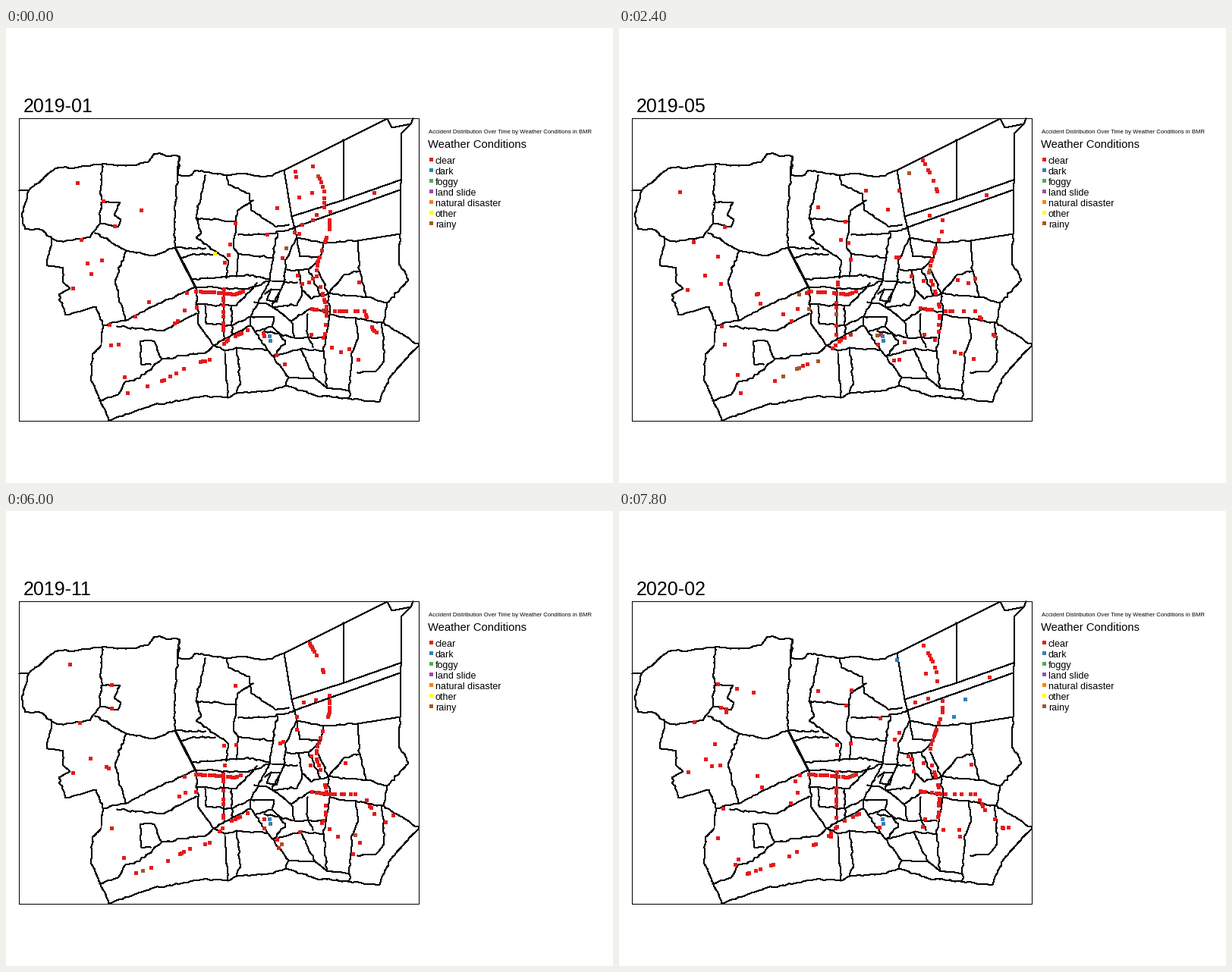
A matplotlib script that plays this animation: 800x600 px, repeating every 8 s.

```python
import numpy as np
import matplotlib.pyplot as plt
from matplotlib.animation import FuncAnimation
from matplotlib.patches import Rectangle

plt.rcParams["font.family"] = "Liberation Sans"
PX = 0.72  # points per pixel at 100 dpi
rng = np.random.default_rng(4)

KINDS = {
    "clear": "#E41A1C", "dark": "#377EB8", "foggy": "#4DAF4A",
    "land slide": "#984EA3", "natural disaster": "#FF7F00",
    "other": "#FFFF00", "rainy": "#A65628",
}

fig = plt.figure(figsize=(8, 6), dpi=100, facecolor="white")
ax = fig.add_axes([0, 0, 1, 1])
ax.set(xlim=(0, 800), ylim=(600, 0))
ax.axis("off")


def pairs(*values):
    return np.reshape(np.array(values, float), (-1, 2))


def straight(*xy):
    p = pairs(*xy) + 0.5
    ax.plot(p[:, 0], p[:, 1], color="black", lw=PX, antialiased=False, zorder=1)


def edge(*xy):
    """Border line with a small irregular wobble."""
    p = pairs(*xy)
    out = [p[0]]
    for a, b in zip(p[:-1], p[1:]):
        n = max(1, int(np.hypot(*(b - a)) / 4))
        for k in range(1, n):
            out.append(a + (b - a) * k / n + rng.normal(0, 0.7, 2))
        out.append(b)
    straight(*np.ravel(out))


# Outer border
edge(17, 214, 30, 213, 64, 185, 95, 183, 126, 179, 165, 181, 187, 176, 195, 165, 228, 169)
edge(30, 213, 20, 245, 25, 265, 44, 265, 60, 277)
edge(60, 277, 53, 312, 75, 316, 74, 334, 84, 343, 69, 351, 78, 378, 118, 367, 127, 391)
edge(127, 391, 125, 418, 113, 430, 112, 465, 135, 517)
edge(135, 517, 195, 496, 265, 485, 292, 487, 303, 481, 352, 477, 368, 471,
     410, 485, 492, 492, 504, 462, 543, 419)
edge(228, 169, 226, 193, 240, 195, 250, 187, 291, 194, 313, 191, 340, 196, 366, 187)
straight(366, 187, 502, 119, 508, 131, 533, 126, 536, 119)
straight(533, 126, 521, 138, 519, 271)
edge(519, 271, 517, 310, 530, 332, 502, 362, 497, 388, 543, 416)

# Western districts
edge(126, 179, 124, 257, 110, 276, 68, 281, 60, 277)
edge(125, 230, 150, 230, 142, 246, 151, 252, 147, 262, 124, 257)
edge(117, 270, 158, 293, 193, 300, 222, 289)
edge(158, 293, 143, 335, 157, 385)
edge(127, 391, 158, 385, 200, 363, 250, 341)
edge(146, 393, 207, 399, 250, 376)
edge(228, 169, 222, 240, 222, 289)
straight(222, 289, 249, 342)
straight(223, 289, 250, 342)
edge(123, 491, 147, 483, 157, 466, 176, 461, 205, 436, 262, 428, 273, 418, 253, 390)
edge(205, 436, 195, 413, 176, 412, 178, 443, 190, 443)

# Northern districts
edge(262, 194, 250, 250, 257, 270, 250, 276, 292, 306, 290, 329)
edge(250, 250, 303, 255, 305, 240, 325, 227)
edge(291, 194, 293, 206, 320, 218, 323, 240, 355, 262, 372, 259)
edge(303, 255, 299, 288, 306, 298, 303, 327)
edge(306, 272, 345, 271, 378, 264)
edge(222, 289, 262, 290)
edge(230, 303, 245, 298, 275, 298)
edge(306, 298, 352, 302)
straight(366, 187, 376, 248, 383, 276)
straight(376, 248, 445, 226, 519, 200)
straight(378, 263, 519, 213)
straight(444, 147, 445, 226)
edge(383, 276, 418, 283, 463, 280)
straight(463, 280, 519, 271)

# Eastern districts
edge(463, 280, 466, 320, 474, 353)
edge(466, 320, 445, 325, 424, 350)
edge(424, 350, 474, 354, 502, 362)
edge(424, 350, 426, 378, 497, 388)
edge(426, 378, 418, 425, 422, 474, 452, 478)
edge(460, 382, 464, 408, 455, 428, 452, 486)
edge(495, 389, 498, 438, 487, 452, 463, 454)
edge(418, 425, 388, 423, 407, 462, 422, 474)

# Southern districts
edge(273, 418, 288, 425, 292, 487)
edge(288, 425, 303, 421, 308, 465, 304, 481)
edge(303, 421, 345, 425, 372, 460, 368, 471)
edge(352, 432, 390, 422)
edge(372, 460, 407, 462)

# Central districts
edge(245, 331, 325, 325, 346, 331)
edge(250, 341, 318, 344, 347, 333)
edge(250, 342, 253, 390)
edge(250, 364, 303, 366, 330, 336)
edge(262, 366, 264, 390, 297, 392, 322, 380)
straight(286, 343, 287, 406)
edge(297, 366, 298, 404)
edge(273, 418, 322, 392, 345, 425)
edge(357, 270, 347, 333, 322, 380, 322, 392)
edge(383, 276, 368, 305, 366, 336, 350, 367)
edge(383, 276, 386, 300, 414, 303, 418, 283)
edge(370, 318, 398, 318, 414, 303)
edge(385, 320, 390, 350, 383, 365, 350, 367)
edge(398, 318, 414, 352, 424, 350)
edge(410, 318, 424, 350)
edge(390, 345, 402, 357, 414, 352)
edge(347, 333, 383, 335)
straight(341, 350, 349, 344, 361, 345, 356, 361, 343, 358, 349, 344)
edge(327, 361, 350, 367, 375, 386, 400, 370, 426, 374)
edge(322, 380, 353, 381, 350, 393, 330, 399)
edge(350, 393, 368, 412, 352, 432)
edge(375, 386, 380, 408, 418, 408)
edge(397, 377, 397, 403, 404, 420)
edge(340, 399, 380, 408)

ax.add_patch(Rectangle((16.5, 118.5), 527, 399, fill=False, lw=PX,
                       ec="black", antialiased=False, zorder=2))

# Roads with the usual number of accidents on each
ROADS = [
    (pairs(250, 347, 285, 349, 300, 351, 314, 347), 18),
    (pairs(288, 335, 286, 348, 286, 405), 9),
    (pairs(400, 174, 411, 194, 419, 214, 419, 236), 8),
    (pairs(426, 250, 426, 266, 410, 311, 408, 324), 13),
    (pairs(408, 324, 422, 366, 421, 400, 416, 412), 13),
    (pairs(394, 369, 425, 373, 472, 373), 12),
    (pairs(474, 378, 484, 398, 500, 410), 5),
    (pairs(160, 481, 206, 465, 243, 444, 268, 437), 10),
    (pairs(279, 424, 292, 411, 322, 396), 7),
]

# Places where accidents recur
SITES = pairs(
    92, 205, 129, 229, 140, 260, 155, 234, 178, 240, 99, 280, 126, 305, 89, 343,
    134, 337, 113, 325, 180, 350, 187, 362, 214, 376, 226, 385, 236, 371, 250, 370,
    237, 350, 136, 393, 140, 418, 154, 457, 305, 234, 262, 237, 324, 212, 299, 255,
    294, 284, 287, 309, 304, 306, 345, 272, 356, 238, 382, 190, 382, 224, 391, 252,
    384, 270, 408, 247, 425, 242, 486, 218, 403, 215, 371, 291, 364, 302, 385, 327,
    400, 334, 447, 333, 465, 335, 340, 406, 342, 417, 355, 432, 363, 438, 388, 423,
    402, 405, 428, 420, 441, 426, 452, 421, 450, 430, 465, 438, 515, 419, 275, 428)

BUSY = [1.1, 0.9, 0.95, 0.9, 0.85, 0.8, 0.85, 0.85, 0.9, 0.9, 1, 1.05, 1, 1]
RAIN = [0.02, 0.02, 0.02, 0.05, 0.1, 0.08, 0.06, 0.1, 0.15, 0.08, 0.03, 0.01, 0.01, 0.01]
DECEMBER = 11
DARK = pairs(347, 406, 348, 412)
DARK_DECEMBER = pairs(373, 250, 413, 263, 455, 258, 497, 208, 263, 290,
                      254, 308, 283, 299, 335, 296, 274, 297)
DARK_LATE = pairs(366, 196, 456, 248, 441, 271)
OTHER = {0: pairs(275, 297), DECEMBER: pairs(449, 184)}


def on_road(road, count):
    """Random stops, three pixels apart or more, along a polyline."""
    dist = np.r_[0, np.cumsum(np.hypot(*np.diff(road, axis=0).T))]
    stops = np.arange(0, dist[-1], 3)
    at = rng.choice(stops, min(count, len(stops)), replace=False)
    return np.column_stack([np.interp(at, dist, road[:, k]) for k in (0, 1)])


def make_month(m):
    parts = [on_road(road, round(n * BUSY[m])) for road, n in ROADS]
    usual = SITES[rng.random(len(SITES)) < 0.6 * BUSY[m]]
    stray = SITES[rng.integers(len(SITES), size=60 if m == DECEMBER else 14)]
    parts += [usual + rng.normal(0, 1.2, usual.shape),
              stray + rng.normal(0, 7, stray.shape)]
    clear = np.vstack(parts).round()
    kinds = np.where(rng.random(len(clear)) < RAIN[m], "rainy", "clear")
    dark = DARK_DECEMBER if m == DECEMBER else DARK
    if m > DECEMBER + 1:
        dark = np.vstack([dark, DARK_LATE])
    other = OTHER.get(m, np.empty((0, 2)))
    xy = np.vstack([clear, dark, other])
    names = [*kinds, *["dark"] * len(dark), *["other"] * len(other)]
    return xy, [KINDS[k] for k in names]


months = [make_month(m) for m in range(len(BUSY))]


def label(x, y, text, size):
    return ax.text(x, y, text, fontsize=size * PX, color="black", va="baseline")


def dots(xy, colors):
    return ax.scatter(xy[:, 0] + 0.5, xy[:, 1] + 0.5, s=(5 * PX) ** 2, c=colors,
                      linewidths=0, antialiased=False, zorder=3)


title = label(22.5, 111, "", 25)
small = label(557, 139, "Accident Distribution Over Time by Weather Conditions in BMR", 7.7)
small.set_clip_path(Rectangle((550, 125), 221, 20, transform=ax.transData))
label(556, 158, "Weather Conditions", 14.7)
for row, name in enumerate(KINDS):
    label(566, 179 + 14 * row, name, 12.5)
dots(np.array([[560, 173 + 14 * r] for r in range(len(KINDS))]), list(KINDS.values()))
spots = dots(*months[0])


def draw(i):
    m = i * 200 // 600
    xy, colors = months[m]
    spots.set_offsets(xy + 0.5)
    spots.set_facecolors(colors)
    title.set_text(f"{2019 + m // 12}-{m % 12 + 1:02d}")
    return spots, title


anim = FuncAnimation(fig, draw, frames=40, interval=200, repeat=True, repeat_delay=0)
plt.show()
```
